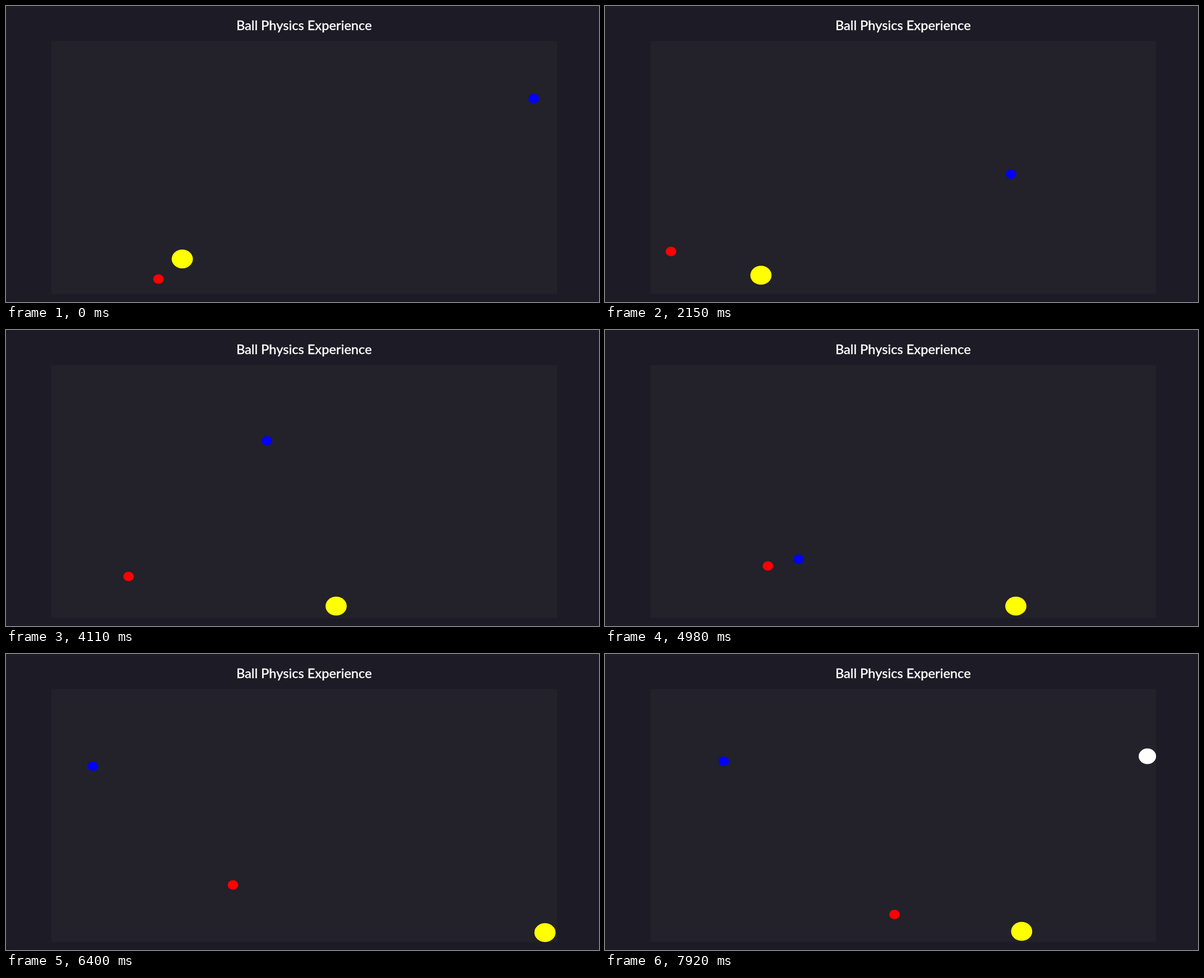
Recreate the animation shown at these times as an HTML page. Size 1058x529 px, loop 8000 ms.

```html
<!DOCTYPE html>
<html lang="en">
<head>
<meta charset="utf-8">
<title>Ball Physics Experience</title>
<style>
  html, body { margin: 0; width: 100%; height: 100%; overflow: hidden; background: #1d1b25; }
  svg { display: block; width: 1058px; height: 529px; }
  .title { font: 500 23.6px Lato, "Open Sans", sans-serif; fill: #fff; stroke: #fff; stroke-width: .3; text-anchor: middle; }
  .tip { font: 7.5px "Open Sans", sans-serif; fill: #555; text-anchor: middle; }
</style>
</head>
<body>
<svg viewBox="0 0 1058 529">
  <rect x="81" y="63" width="902" height="451.5" fill="#23212a"/>
  <text class="title" x="531.8" y="42.5">Ball Physics Experience</text>
  <ellipse id="white" rx="15.5" ry="14" fill="#fff"/>
  <ellipse id="yellow" rx="18.9" ry="16.9" fill="#ff0"/>
  <ellipse id="red" rx="9.5" ry="8.5" fill="#f00"/>
  <ellipse id="blue" rx="9.5" ry="8.5" fill="#00f"/>
  <g id="tip" class="tip">
    <rect x="1007.5" y="519.5" width="24" height="14" fill="#f0f0f0" stroke="#c8c8c8"/>
    <text x="1019.5" y="530">Pausa</text>
  </g>
  <path id="cursor" d="M0 0V9.2L2.1 7.3L3.7 11L5.1 10.4L3.5 6.8H6.4Z" fill="#fff" stroke="#111" stroke-width=".5"/>
</svg>
<script>
const LOOP = 8000, STEPS = 119, STEP = LOOP / STEPS;
const LEFT = 81, RIGHT = 983, FLOOR = 515;
const GRAVITY = 0.0057;
const HIT = 208; // red and yellow collide
const BORN = 1001; // white is dropped

// The recorded simulation runs slightly unevenly: [step, simulation clock]
const PACE = [[0, 0], [21, 185.5], [48, 420], [74, 660], [95, 850.5], [118, 1036.5]];

// x at clock `from`, speed v, a floor contact at `hop` and the time to the next one
const BALLS = {
  blue: [{ from: 0, x: 941.5, v: 1, hop: -308.4, period: 502.4 }],
  red: [
    { from: 0, x: 272, v: -1.205, hop: -31, period: 136 },
    { from: HIT, x: 161.5, v: -0.6, hop: -38.8, period: 261 }
  ],
  yellow: [
    { from: 0, x: 314.5, v: -0.609, hop: -37.6, period: 252 },
    { from: HIT, x: 190.6, v: 1.2, hop: 116.8, period: 111.2, keep: 0.98 }
  ]
};

const VISITS = [
  { from: 790, to: 1610, start: [1038, 520], end: [1009, 487] },
  { from: 2290, to: 3800, start: [1043, 436], end: [956, 430] },
  { from: 4380, to: 4650, start: [985, 408], end: [1056, 392] }
];
const TRAVEL = 250;

const el = id => document.getElementById(id);
const show = (id, on) => { el(id).style.display = on ? "" : "none"; };
const mix = (a, b, k) => a + (b - a) * k;

function place(id, x, y) {
  el(id).setAttribute("transform", `translate(${x.toFixed(2)} ${y.toFixed(2)})`);
}

function clock(step) {
  const i = Math.min(PACE.filter(p => p[0] <= step).length, PACE.length - 1);
  const [n0, s0] = PACE[i - 1], [n1, s1] = PACE[i];
  return mix(s0, s1, (step - n0) / (n1 - n0));
}

// Reflect x between two walls
function fold(x, lo, hi) {
  const w = hi - lo, u = (((x - lo) % (2 * w)) + 2 * w) % (2 * w);
  return lo + (u < w ? u : 2 * w - u);
}

function height({ hop, period, keep = 1 }, s) {
  while (s > hop + period) {
    hop += period;
    period *= keep;
  }
  return GRAVITY * (s - hop) * (hop + period - s);
}

function moveBall(id, legs, s) {
  const leg = legs.filter(l => l.from <= s).pop();
  const rx = el(id).rx.baseVal.value, ry = el(id).ry.baseVal.value;
  const x = fold(leg.x + leg.v * (s - leg.from), LEFT + rx, RIGHT - rx);
  place(id, x, FLOOR - ry - height(leg, s));
}

function draw(time) {
  const step = Math.min(Math.floor((time + 15) / STEP), STEPS - 1);
  const t = step * STEP, s = clock(step);

  for (const id in BALLS) moveBall(id, BALLS[id], s);

  show("white", s >= BORN);
  place("white", RIGHT - 15.3, 175.6 + GRAVITY * (s - BORN) ** 2);

  const visit = VISITS.find(v => t >= v.from && t < v.to);
  show("cursor", visit);
  if (visit) {
    const k = Math.min((t - visit.from) / TRAVEL, 1);
    place("cursor", ...visit.start.map((p, i) => mix(p, visit.end[i], k)));
  }
  show("tip", t >= 1200 && t < VISITS[0].to);
}

const start = performance.now();
function tick() {
  draw((performance.now() - start) % LOOP);
  requestAnimationFrame(tick);
}
tick();
</script>
</body>
</html>
```
